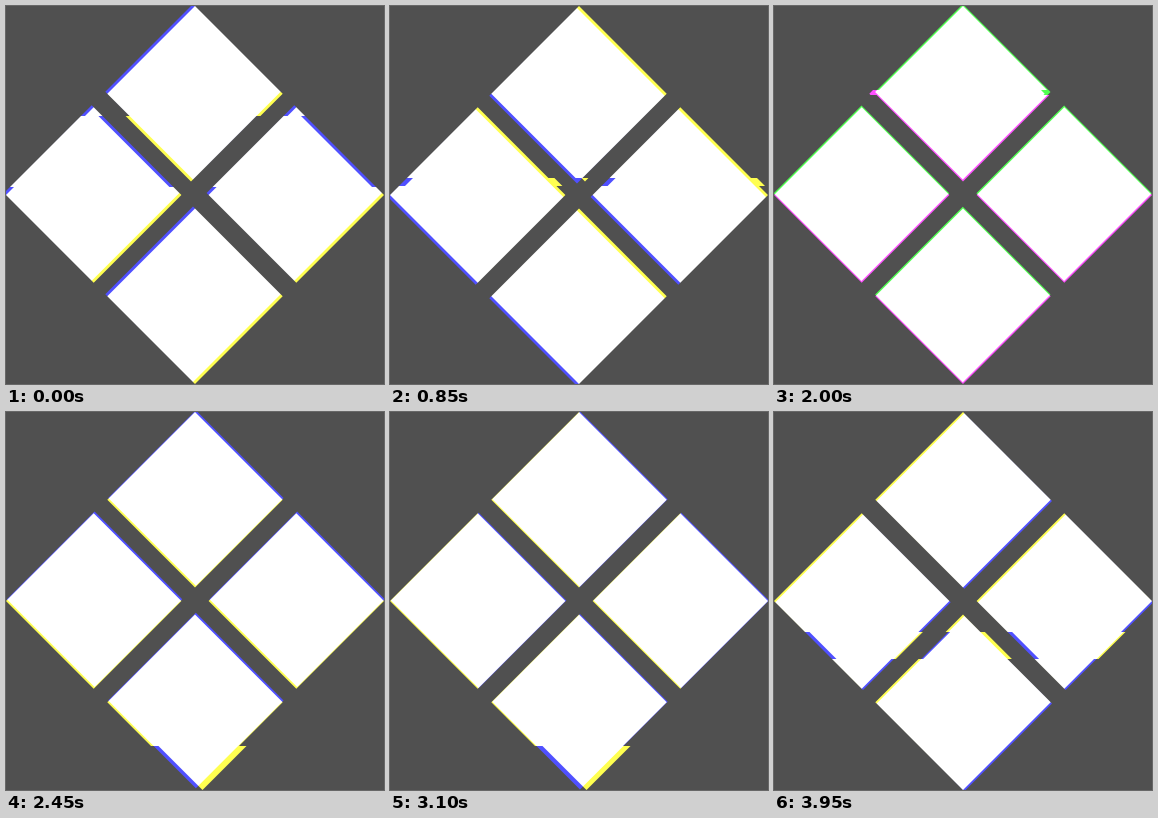
An HTML page with a canvas that plays this animation: 378 px wide and 378 px high, repeating every 4 s.

```html
<!DOCTYPE html>
<html lang="en">
<head>
<meta charset="utf-8">
<title>Diamond glitch</title>
<style>
  html, body { margin: 0; width: 100%; height: 100%; overflow: hidden; background: #505050; }
  canvas { display: block; }
</style>
</head>
<body>
<canvas id="stage" width="378" height="378"></canvas>
<script>
const SIZE = 378, MID = SIZE / 2, HALF = 87.7, REACH = MID - HALF;
const LOOP = 4000, STEPS = 44;
const ctx = document.getElementById('stage').getContext('2d');

// Each tint splits white into one drifting channel and the two that remain.
const BLUE = { drift: 'rgb(0,0,175)', rest: 'rgb(175,175,0)' };
const GREEN = { drift: 'rgb(0,175,0)', rest: 'rgb(175,0,175)' };

// x, y: drift of the single channel; top..bottom: torn band, pushed sideways by shift
const poses = [
  { step: 0, tint: BLUE, x: -2, y: -2, top: 110, bottom: 181, shift: -4 },
  { step: 10, tint: BLUE, x: -2, y: 2, top: 172, bottom: 180, shift: 6 },
  { step: 16, tint: GREEN, x: -1.8, y: -0.6, top: 0, bottom: 0, shift: 0 },
  { step: 22, tint: GREEN, x: -0.2, y: -1.8, top: 84, bottom: 89, shift: -6 },
  { step: 31, tint: BLUE, x: 1.7, y: -1.7, top: 334, bottom: 378, shift: 7.5 },
  { step: 38, tint: BLUE, x: 0, y: 1.1, top: 220, bottom: 234, shift: 4 },
  { step: 43, tint: BLUE, x: 1.3, y: 1.3, top: 220, bottom: 247, shift: 4.5 },
  { step: 44, tint: BLUE, x: -2, y: -2, top: 110, bottom: 181, shift: -4 }
];

const mix = (a, b, p) => a + (b - a) * p;

// Steps last about 93 ms, aligned to a 50 ms clock.
function stepAt(ms) {
  const tick = Math.floor((ms % LOOP) / 50);
  return Math.min(STEPS - 1, Math.ceil((tick + 1.57) / 1.853) - 1);
}

function poseAt(step) {
  const next = poses.findIndex(pose => pose.step > step);
  const a = poses[next - 1], b = poses[next];
  const p = (step - a.step) / (b.step - a.step);
  const near = p < 0.5 ? a : b;
  const bottom = a.top === b.top ? mix(a.bottom, b.bottom, p) : near.bottom;
  return { ...near, bottom: Math.round(bottom), x: mix(a.x, b.x, p), y: mix(a.y, b.y, p) };
}

function diamonds(color, dx, dy) {
  ctx.fillStyle = color;
  ctx.beginPath();
  for (const [sx, sy] of [[0, -1], [1, 0], [0, 1], [-1, 0]]) {
    const cx = MID + sx * REACH + dx, cy = MID + sy * REACH + dy;
    ctx.moveTo(cx, cy - HALF);
    ctx.lineTo(cx + HALF, cy);
    ctx.lineTo(cx, cy + HALF);
    ctx.lineTo(cx - HALF, cy);
    ctx.closePath();
  }
  ctx.fill();
}

function band(top, bottom, color, shift) {
  if (bottom <= top) return;
  ctx.save();
  ctx.beginPath();
  ctx.rect(0, top, SIZE, bottom - top);
  ctx.clip();
  diamonds(color, shift, 0);
  ctx.restore();
}

function draw(ms) {
  const { tint, x, y, top, bottom, shift } = poseAt(stepAt(ms));

  ctx.globalCompositeOperation = 'source-over';
  ctx.fillStyle = '#505050';
  ctx.fillRect(0, 0, SIZE, SIZE);
  ctx.globalCompositeOperation = 'lighter';
  diamonds(tint.drift, x, y);
  band(0, top, tint.rest, 0);
  band(top, bottom, tint.rest, shift);
  band(bottom, SIZE, tint.rest, 0);
}

const start = performance.now();
function tick() {
  draw(performance.now() - start);
  requestAnimationFrame(tick);
}
tick();
</script>
</body>
</html>
```
